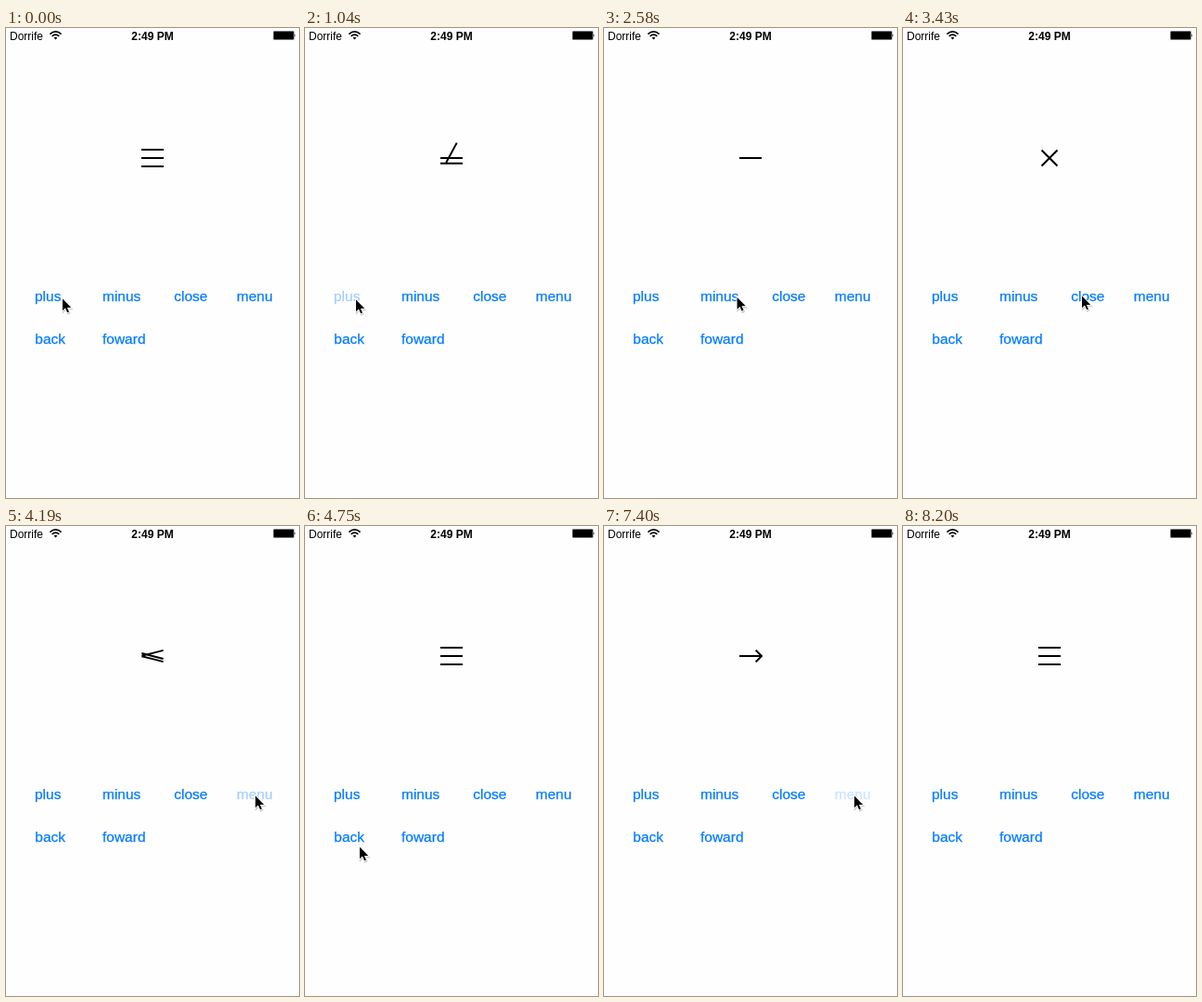
Write an HTML page that moves like this. It is 316 px wide and 506 px high and loops after 8.91 s.

```html
<!DOCTYPE html>
<html lang="en">
<head>
<meta charset="utf-8">
<title>Morphing icon button</title>
<style>
  html, body { margin: 0; height: 100%; overflow: hidden; background: #fefefe; }
  svg { display: block; width: 100vw; height: 100vh; font-family: "Liberation Sans", Arial, sans-serif; }
  #buttons { fill: #007aff; stroke: #007aff; stroke-width: .25; font-size: 15.5px; }
  #status { font-size: 12px; }
  #icon { fill: none; stroke: #000; stroke-width: 2; stroke-linejoin: round; }
</style>
</head>
<body>
<svg viewBox="0 0 316 506">
  <g id="status">
    <text x="4" y="13">Dorrife</text>
    <g fill="none" stroke="#000" stroke-width="1.7">
      <path d="M47.4 6.6Q53.5 1.2 59.6 6.6M49.7 8.9Q53.5 5.5 57.3 8.9"/>
      <path d="M53.5 12.4L51.6 10.4Q53.5 8.9 55.4 10.4Z" fill="#000" stroke="none"/>
    </g>
    <text x="158" y="13" text-anchor="middle" font-weight="bold">2:49 PM</text>
    <rect x="288.5" y="3.5" width="22" height="9" rx="1" stroke="#777"/>
    <path d="M311.4 6.3q1.6 1.7 0 3.4z"/>
  </g>
  <g id="buttons"></g>
  <path id="icon"/>
  <g id="cursor">
    <path d="M0 0V12.8L3 10 5.1 14.7 7 13.9 4.9 9.4H9.2Z" transform="translate(.6 1.5)" opacity=".2" stroke="#000" stroke-width="1.6"/>
    <path d="M0 0V12.8L3 10 5.1 14.7 7 13.9 4.9 9.4H9.2Z" stroke="#fff" stroke-width="1.6" paint-order="stroke"/>
  </g>
</svg>
<script>
const LOOP = 8910, CURSOR_GONE = 8200;
const CX = 158, CY = 140, HALF = 12, GAP = 9, ARM = 9;

// Each segment has a pivot, two half angles in degrees and a half length.
const segment = (a, b, y = 0, x = 0, length = HALF) => [x, y, a, b, length];
const bar = (y = 0) => segment(0, 180, y);
const icons = {
  menu: [bar(-GAP), bar(), bar(GAP)],
  plus: [segment(-90, 90), bar(), bar()],
  minus: [bar(), bar(), bar()],
  close: [segment(-45, 135), segment(45, 225), segment(45, 225)],
  back: [segment(-45, 45, 0, -12, ARM), bar(), bar()],
  foward: [segment(135, 225, 0, 12, ARM), bar(), bar()]
};

const labels = {
  plus: [31, 294], minus: [104, 294], close: [181.3, 294],
  menu: [248.8, 294], back: [31.3, 340], foward: [104, 340]
};

// Button, press time, release time
const taps = [
  ["plus", 920, 980], ["minus", 1900, 2070], ["close", 2920, 3090],
  ["menu", 3950, 4130], ["back", 5100, 5270], ["foward", 6130, 6300],
  ["menu", 7400, 7520]
];

// Start, end, x, y of each pointer move
const moves = [
  [0, 0, 61, 291.5], [50, 170, 55, 292.5], [1230, 1660, 124, 290.5],
  [2430, 2860, 193, 288.5], [3440, 3890, 269, 290.5], [4290, 4740, 59, 345.5],
  [4750, 4980, 48, 342.5], [5430, 5830, 123, 343.5],
  [6650, 7110, 270, 290.5], [7780, 8200, 273, 466]
];

const $ = id => document.getElementById(id);
const clamp = v => Math.min(1, Math.max(0, v));
const mix = (a, b, p) => a + (b - a) * p;
const smooth = p => p * p * (3 - 2 * p);
const spring = s => 1 - Math.exp(-10 * s) * (Math.cos(14 * s) + 5 / 7 * Math.sin(14 * s));

const buttons = {};
for (const [name, [x, y]] of Object.entries(labels)) {
  const text = document.createElementNS("http://www.w3.org/2000/svg", "text");
  text.setAttribute("x", x);
  text.setAttribute("y", y);
  text.textContent = name;
  buttons[name] = $("buttons").appendChild(text);
}

function iconPath(t) {
  const index = taps.findLastIndex(tap => t >= tap[2]);
  const from = icons[index > 0 ? taps[index - 1][0] : "menu"];
  const to = icons[index >= 0 ? taps[index][0] : "menu"];
  const s = index >= 0 ? (t - taps[index][2]) / 1000 : 9;
  const shift = spring(s), turn = spring(s * 1.65);
  return to.map((target, i) => {
    const [x, y, a, b, length] = target.map((v, k) =>
      mix(from[i][k], v, k === 2 || k === 3 ? turn : shift));
    const end = angle => {
      const r = angle * Math.PI / 180;
      return `${CX + x + length * Math.cos(r)} ${CY + y + length * Math.sin(r)}`;
    };
    return `M${end(a)}L${CX + x} ${CY + y}L${end(b)}`;
  }).join("");
}

function cursorAt(t) {
  let [, , x, y] = moves[0];
  for (const [start, end, toX, toY] of moves.slice(1)) {
    const p = smooth(clamp((t - start) / (end - start)));
    x = mix(x, toX, p);
    y = mix(y, toY, p);
  }
  return `translate(${x} ${y})`;
}

function opacityOf(name, t) {
  const tap = taps.findLast(([n, press]) => n === name && t >= press);
  return tap ? mix(0.2, 1, clamp((t - tap[2]) / 300)) : 1;
}

function draw() {
  const t = performance.now() % LOOP;
  $("icon").setAttribute("d", iconPath(t));
  $("cursor").setAttribute("transform", cursorAt(t));
  $("cursor").style.display = t < CURSOR_GONE ? "" : "none";
  for (const name in buttons) buttons[name].style.opacity = opacityOf(name, t);
  requestAnimationFrame(draw);
}
draw();
</script>
</body>
</html>
```
